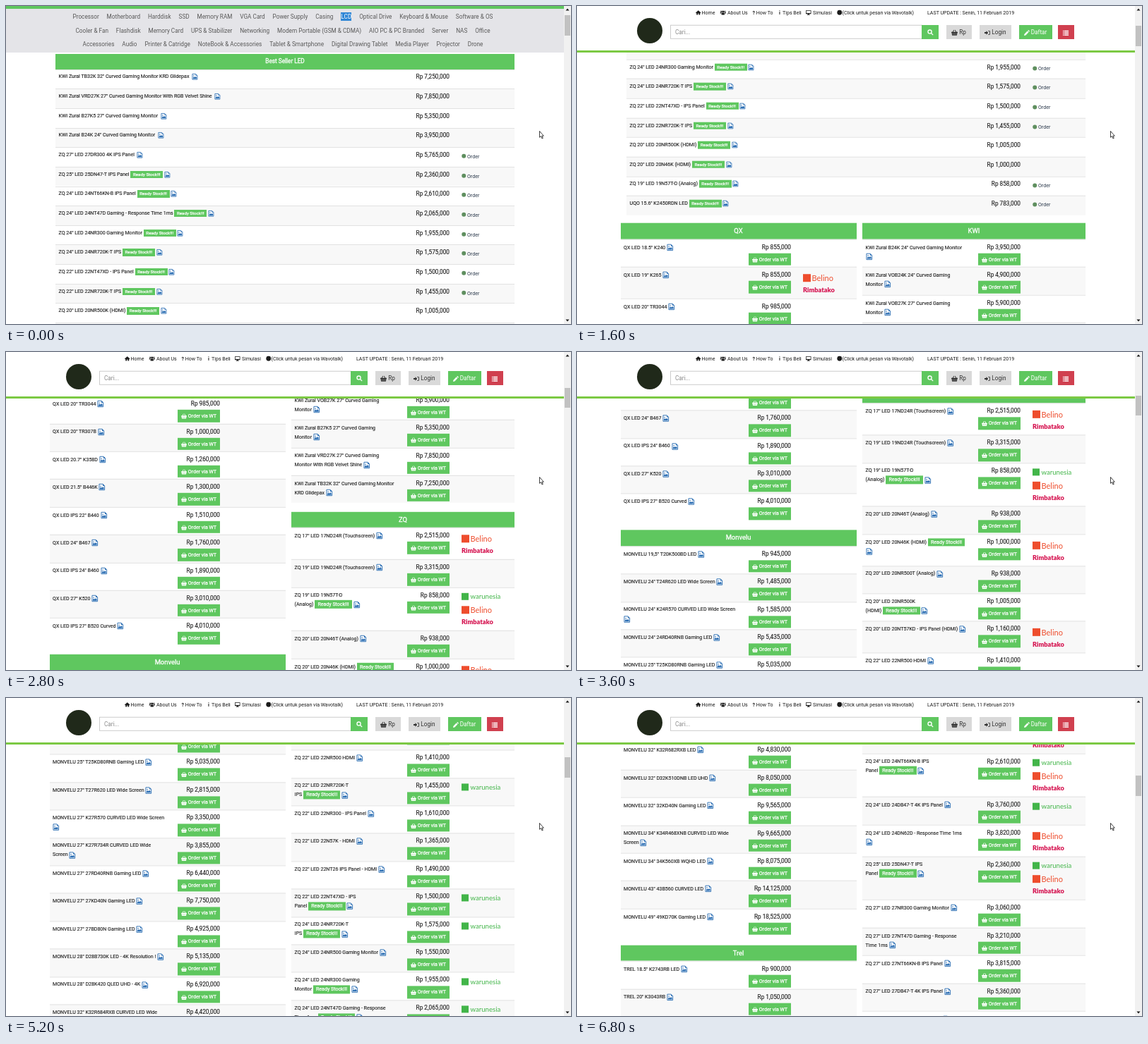
Write an HTML page that moves like this. It is 800 px wide and 451 px high and loops after 7 s.

```html
<!DOCTYPE html>
<html lang="id">
<head>
<meta charset="utf-8">
<title>Monitor price list</title>
<style>
html, body { margin: 0; width: 100%; height: 100%; overflow: hidden; background: #fff; }
#stage { position: relative; width: 800px; height: 451px; overflow: hidden; font: 7.06px Roboto, sans-serif; color: #1b1b1b; }
#stage div { position: absolute; white-space: nowrap; box-sizing: border-box; }
svg { fill: currentColor; vertical-align: -12%; overflow: visible; }
#page, #head { left: 0; top: 0; width: 790px; }
#menu { width: 790px; height: 66.3px; background: #e4e4e8; border-top: 4px solid #5fc75f; }
#menu div { left: 0; width: 784px; display: flex; justify-content: center; gap: 10.85px; font-size: 8.24px; line-height: 12px; color: #5a5a5a; }
#menu .on { background: #2f86d6; color: #fff; }
.bar { left: 0; right: 0; background: #5fc75f; color: #fff; text-align: center; -webkit-text-stroke: .3px; }
.row { left: 0; right: 0; border-top: 1px solid #e2e2e2; }
.even { background: #f8f8f8; }
.name { left: 4.6px; top: 4.9px; line-height: 12.9px; -webkit-text-stroke: .12px; }
.price { top: 5px; line-height: 10px; font-size: 8.24px; -webkit-text-stroke: .12px; }
.buy { top: 19px; width: 60px; height: 17.4px; line-height: 17.4px; background: #5fc75f; color: #fff; text-align: center; -webkit-text-stroke: .25px; }
.tag { display: inline-block; background: #5fc75f; color: #fff; padding: 0 .6em; line-height: 11.6px; -webkit-text-stroke: .25px; }
.best .name { top: 3.8px; }
.best .price { top: 4.8px; }
.best .tag { font-size: 6.18px; line-height: 10.4px; }
.pic { color: #2d6fb4; vertical-align: -20%; }
.mid { transform: translateY(-50%); }
.btn { top: 26.5px; height: 20.5px; line-height: 20.5px; font-size: 8.24px; text-align: center; background: #d9d9d9; color: #333; }
.go { background: #5fc75f; color: #fff; }
#head { height: 66px; background: #fff; border-bottom: 3px solid #7cc944; }
#scroll { left: 790px; top: 0; width: 10px; height: 451px; background: #f1f1f1; }
#thumb { left: 1px; width: 8px; height: 28.5px; background: #c1c1c1; }
</style>
</head>
<body>
<div id="stage">
  <div id="page"></div>
  <div id="head"></div>
  <div id="scroll">
    <svg width="10" height="451" fill="#505050"><path d="M2.5 6.5 5 3.5 7.5 6.5ZM2.5 444.5 5 447.5 7.5 444.5Z"/></svg>
    <div id="thumb"></div>
  </div>
  <div style="left:755px;top:177px"><svg width="7" height="12"><path d="M.5.5V9.3L2.5 7.6 4 11 5.3 10.4 3.9 7.2H6.3Z" fill="#fff" stroke="#111" stroke-width=".8"/></svg></div>
</div>
<script>
const NOTCH = 58.82;
const ROW = 39.4;
const MENU = [
  'Processor,Motherboard,Harddisk,SSD,Memory RAM,VGA Card,Power Supply,Casing,LCD,Optical Drive,Keyboard & Mouse,Software & OS',
  'Cooler & Fan,Flashdisk,Memory Card,UPS & Stabilizer,Networking,Modem Portable (GSM & CDMA),AIO PC & PC Branded,Server,NAS,Office',
  'Accessories,Audio,Printer & Catridge,NoteBook & Accessories,Tablet & Smartphone,Digital Drawing Tablet,Media Player,Projector,Drone'
];

// Row: name | price | links. In a name, * is the stock tag and / a line break.
// Links: o order, t s b marketplaces.
const BEST = `KWI Zural TB32K 32" Curved Gaming Monitor KRD Glidepax|7,250,000
KWI Zural VRD27K 27" Curved Gaming Monitor With RGB Velvet Shine|7,850,000
KWI Zural B27K5 27" Curved Gaming Monitor|5,350,000
KWI Zural B24K 24" Curved Gaming Monitor|3,950,000
ZQ 27" LED 27DR300 4K IPS Panel|5,765,000|o
ZQ 25" LED 25DN47-T IPS Panel *|2,360,000|o
ZQ 24" LED 24NT66KN-B IPS Panel *|2,610,000|o
ZQ 24" LED 24NT47D Gaming - Response Time 1ms *|2,065,000|o
ZQ 24" LED 24NR300 Gaming Monitor *|1,955,000|o
ZQ 24" LED 24NR720K-T IPS *|1,575,000|o
ZQ 22" LED 22NT47XD - IPS Panel *|1,500,000|o
ZQ 22" LED 22NR720K-T IPS *|1,455,000|o
ZQ 20" LED 20NR500K (HDMI) *|1,005,000
ZQ 20" LED 20N46K (HDMI) *|1,000,000
ZQ 19" LED 19N57T-D (Analog) *|858,000|o
UQO 15.6" K2450RDN LED *|783,000|o`;

const LEFT = [['QX', `QX LED 18.5" K240|855,000
QX LED 19" K265|855,000|sb
QX LED 20" TR3044|985,000
QX LED 20" TR307B|1,000,000
QX LED 20.7" K358D|1,260,000
QX LED 21.5" B446K|1,300,000
QX LED IPS 22" B440|1,510,000
QX LED 24" B467|1,760,000
QX LED IPS 24" B460|1,890,000
QX LED 27" K520|3,010,000
QX LED IPS 27" B520 Curved|4,010,000`], ['Monvelu', `MONVELU 19,5" T20K500BD LED|945,000
MONVELU 24" T24R620 LED Wide Screen|1,485,000
MONVELU 24" K24R570 CURVED LED Wide Screen/|1,585,000
MONVELU 24" 24RD40RNB Gaming LED|5,435,000
MONVELU 25" T25KD80RNB Gaming LED|5,035,000
MONVELU 27" T27R620 LED Wide Screen|2,815,000
MONVELU 27" K27R570 CURVED LED Wide Screen/|3,350,000
MONVELU 27" K27R734R CURVED LED Wide/Screen|3,855,000
MONVELU 27" 27RD40RNB Gaming LED|6,440,000
MONVELU 27" 27KD40N Gaming LED|7,750,000
MONVELU 27" 27BD80N Gaming LED|4,925,000
MONVELU 28" D28B730K LED - 4K Resolution !|5,135,000
MONVELU 28" D28K420 QLED UHD - 4K|6,920,000
MONVELU 32" K32R684RXB CURVED LED Wide/Screen|4,420,000
MONVELU 32" K32R682RXB LED|4,830,000
MONVELU 32" D32K510DNB LED UHD|8,050,000
MONVELU 32" 32KD40N Gaming LED|9,565,000
MONVELU 34" K34R468XNB CURVED LED Wide/Screen|9,665,000
MONVELU 34" 34K560XB WQHD LED|8,075,000
MONVELU 43" 43B560 CURVED LED|14,125,000
MONVELU 49" 49KD70K Gaming LED|18,525,000`], ['Trel', `TREL 18.5" K2743RB LED|900,000
TREL 20" K3043RB|1,050,000`]];

const RIGHT = [['KWI', `KWI Zural B24K 24" Curved Gaming Monitor/|3,950,000
KWI Zural VOB24K 24" Curved Gaming/Monitor|4,900,000
KWI Zural VOB27K 27" Curved Gaming/Monitor|5,900,000
KWI Zural B27K5 27" Curved Gaming/Monitor|5,350,000
KWI Zural VRD27K 27" Curved Gaming/Monitor With RGB Velvet Shine|7,850,000
KWI Zural TB32K 32" Curved Gaming Monitor/KRD Glidepax|7,250,000`], ['ZQ', `ZQ 17" LED 17ND24R (Touchscreen)|2,515,000|sb
ZQ 19" LED 19ND24R (Touchscreen)|3,315,000
ZQ 19" LED 19N57T-D/(Analog) *|858,000|tsb
ZQ 20" LED 20N46T (Analog)|938,000
ZQ 20" LED 20N46K (HDMI) */|1,000,000|sb
ZQ 20" LED 20NR500T (Analog)|938,000
ZQ 20" LED 20NR500K/(HDMI) *|1,005,000
ZQ 20" LED 20NT57KD - IPS Panel (HDMI)|1,160,000|sb
ZQ 22" LED 22NR500 HDMI|1,410,000
ZQ 22" LED 22NR720K-T/IPS *|1,455,000|t
ZQ 22" LED 22NR300 - IPS Panel|1,610,000
ZQ 22" LED 22N57K - HDMI|1,365,000
ZQ 22" LED 22NT26 IPS Panel - HDMI|1,490,000
ZQ 22" LED 22NT47XD - IPS/Panel *|1,500,000|t
ZQ 24" LED 24NR720K-T/IPS *|1,575,000|t
ZQ 24" LED 24NR500 Gaming Monitor|1,550,000
ZQ 24" LED 24NR300 Gaming/Monitor *|1,955,000|t
ZQ 24" LED 24NT47D Gaming - Response/Time 1ms *|2,065,000|tsb
ZQ 24" LED 24NT66KN-B IPS/Panel *|2,610,000|tsb
ZQ 24" LED 24DB47-T 4K IPS Panel|3,760,000|t
ZQ 24" LED 24DN62D - Response Time 1ms/|3,820,000|sb
ZQ 25" LED 25DN47-T IPS/Panel *|2,360,000|tsb
ZQ 27" LED 27NR300 Gaming Monitor|3,060,000
ZQ 27" LED 27NT47D Gaming - Response/Time 1ms|3,210,000
ZQ 27" LED 27NT66KN-B IPS Panel|3,815,000
ZQ 27" LED 27DB47-T 4K IPS Panel|5,360,000
ZQ 27" LED 27DR300 4K IPS Panel|5,765,000`]];

const ICONS = {
  home: '<path d="M6 1 0 6.5 1 7.5 2 6.6V11H5V8H7V11H10V6.6L11 7.5 12 6.5Z"/>',
  users: '<circle cx="6" cy="4" r="2.4"/><circle cx="1.8" cy="3.4" r="1.6"/><circle cx="10.2" cy="3.4" r="1.6"/><path d="M2.5 11V8.5Q3 6.5 6 6.5T9.5 8.5V11ZM-.5 8V6Q1 4.5 3 6L2 8ZM12.5 8V6Q11 4.5 9 6L10 8Z"/>',
  desktop: '<path d="M0 1H12V9H7.5V10.5H9V11.5H3V10.5H4.5V9H0ZM1.2 2.2V7H10.8V2.2Z" fill-rule="evenodd"/>',
  search: '<g fill="none" stroke="currentColor" stroke-width="1.9"><circle cx="5" cy="5" r="3.6"/><path d="M7.6 7.6 11.5 11.5"/></g>',
  basket: '<path d="M0 5H2.3L4.5 1 5.5 1.6 3.7 5H8.3L6.5 1.6 7.5 1 9.7 5H12V6.5H11.3L10.5 11.5H1.5L.7 6.5H0ZM3.3 7.5V10H4V7.5ZM5.6 7.5V10H6.4V7.5ZM8 7.5V10H8.7V7.5Z" fill-rule="evenodd"/>',
  login: '<path d="M0 4.5H3.5V2L8 6 3.5 10V7.5H0ZM7.5 1.5H10Q12 1.5 12 3.5V8.5Q12 10.5 10 10.5H7.5V9.3H10Q10.7 9.3 10.7 8.5V3.5Q10.7 2.7 10 2.7H7.5Z"/>',
  pencil: '<path d="M0 12 .8 8.5 7 2.3 9.7 5 3.5 11.2ZM7.8 1.5 9.3 0 12 2.7 10.5 4.2Z"/>',
  list: '<path d="M0 1H2V3H0ZM3 1H12V3H3ZM0 4H2V6H0ZM3 4H12V6H3ZM0 7H2V9H0ZM3 7H12V9H3ZM0 10H2V12H0ZM3 10H12V12H3Z"/>',
  dot: '<circle cx="6" cy="6" r="5.5"/>',
  pic: '<path d="M1.2.6H8L11 3.6V11.4H1.2Z" fill="#fff" stroke="currentColor" stroke-width="1.2"/><path d="M7.6.6V4H11Z"/><path d="M2.5 10V8L4.5 6 6 7.5 8 5.5 9.7 7.5V10Z"/><circle cx="4" cy="4.3" r="1"/>'
};
const SHOPS = {
  t: ['#42b549', 'warunesia', '9.6px Lato'],
  s: ['#ee4d2d', 'Belino', '11px Lato'],
  b: ['#d5124f', 'Rimbatako', '900 9.2px Lato']
};

const $ = id => document.getElementById(id);
const icon = (name, size = 7.5, cls = '') => `<svg class="${cls}" viewBox="0 0 12 12" width="${size}" height="${size}">${ICONS[name]}</svg>`;
const at = (x, y, html, style = '') => `<div class="mid" style="left:${x}px;top:${y}px;${style}">${html}</div>`;
const box = (cls, x, y, w, html) => `<div class="${cls}" style="left:${x}px;top:${y}px;width:${w}px">${html}</div>`;
const bar = (y, h, size, text) => `<div class="bar" style="top:${y}px;height:${h}px;font-size:${size}px;line-height:${h}px">${text}</div>`;

function shopLinks(links, x) {
  const shift = links.includes('t') ? 16.8 : 0;
  const centre = { t: 12.3, s: 15 + shift, b: 32 + shift };
  return [...links].map(k => {
    const [color, text, font] = SHOPS[k], size = k === 't' ? 10 : 11;
    const mark = k === 'b' ? '' : at(x, centre[k], '', `width:${size}px;height:${size}px;background:${color}`);
    return mark + at(x + (mark && 12.5), centre[k], text, `color:${color};font:${font},sans-serif`);
  }).join('');
}

function row(line, i, y, h, right, best) {
  const [name, price, links = ''] = line.split('|');
  const gap = best && !name.includes('*') ? '&nbsp; ' : ' ';
  const label = name.replace('/', '<br>').replace('*', '<span class="tag">Ready Stock!!!</span>');
  const extra = best
    ? links && at(right + 17, 11.4, icon('dot', 6.5), 'color:#5f8f5f') + at(right + 25, 11.9, 'Order', 'color:#2c3a4c')
    : `<div class="buy" style="left:${right - 60}px">${icon('basket', 8)} Order via WT</div>` + shopLinks(links, right + 17);
  return `<div class="row ${i % 2 ? 'even' : ''}" style="top:${y}px;height:${h}px">
    <div class="name">${label}${gap}${icon('pic', best ? 8.6 : 9.4, 'pic')}</div>
    <div class="price" style="right:calc(100% - ${right}px)">Rp ${price}</div>${extra}</div>`;
}

function column(x, w, right, groups) {
  let y = 0, html = '';
  for (const [title, rows] of groups) {
    html += bar(y, 22.6, 9.41, title);
    y += 22.6;
    rows.split('\n').forEach((line, i) => {
      const count = (line.split('|')[2] || '').length;
      const h = count === 3 ? 61.8 : count === 2 ? 44.8 : ROW;
      html += row(line, i, y, h, right);
      y += h;
    });
    y += 12.4;
  }
  return box('', x, 543.4, w, html);
}

const menu = MENU.map((line, i) => `<div style="top:${5 + i * 19.5}px">` +
  line.split(',').map(s => `<span class="${s === 'LCD' ? 'on' : ''}">${s}</span>`).join('') + '</div>').join('');
const best = BEST.split('\n').map((line, i) => row(line, i, 21.6 + i * 27.65, 27.65, 558, true)).join('');
$('page').innerHTML = `<div id="menu">${menu}</div>` +
  box('best', 70, 68, 650, bar(0, 21.6, 8.24, 'Best Seller LED') + best) +
  column(61.5, 334, 241.5, LEFT) + column(404, 316, 224, RIGHT);

$('head').innerHTML =
  [[168, 'home', 176.5, 'Home'], [203, 'users', 213, 'About Us'], [324, 'desktop', 334, 'Simulasi'],
   [367.5, 'dot', 375.5, '(Click untuk pesan via Wavotalk)']]
    .map(([ix, name, x, text]) => at(ix, 9, icon(name)) + at(x, 9.3, text)).join('') +
  at(248.5, 9.3, '<b>?</b> How To') + at(286, 9.3, '<b>i</b>') + at(291, 9.3, 'Tips Beli') +
  at(496, 9.3, 'LAST UPDATE : Senin, 11 Februari 2019') +
  at(85, 35, '', 'width:36px;height:36px;border-radius:50%;background:#20291a') +
  at(132, 36.75, 'Cari...', 'width:357px;height:20.5px;border:1px solid #ccc;padding-left:6px;font-size:8.24px;line-height:18px;color:#888') +
  box('btn go', 488, 26.5, 23.5, icon('search', 8.5)) +
  box('btn', 522.5, 26.5, 36, icon('basket', 9) + ' Rp') +
  box('btn', 570, 26.5, 45, icon('login', 8) + ' Login') +
  box('btn go', 625.5, 26.5, 47, icon('pencil', 8) + ' Daftar') +
  box('btn go" id="list', 680.5, 26.5, 23.5, icon('list', 8));
$('list').style.background = '#d0404f';

// Wheel notches reached at given times; the view jumps by whole notches every 200 ms.
const KEYS = [[0, 0], [1000, 2], [2000, 6], [2800, 10], [4200, 16], [5200, 19], [6800, 26]];
function notches(t) {
  const i = KEYS.findIndex(k => k[0] > t);
  if (i < 0) return 26;
  const [t0, n0] = KEYS[i - 1], [t1, n1] = KEYS[i];
  return Math.round(n0 + (n1 - n0) * (t - t0) / (t1 - t0));
}

function draw(now) {
  const n = notches(Math.floor(now % 7000 / 200) * 200);
  $('page').style.transform = `translateY(${-n * NOTCH}px)`;
  $('head').style.visibility = n >= 4 ? 'visible' : 'hidden';
  $('thumb').style.top = 13.3 + n * 3.73 + 'px';
  requestAnimationFrame(draw);
}
requestAnimationFrame(draw);
</script>
</body>
</html>
```
